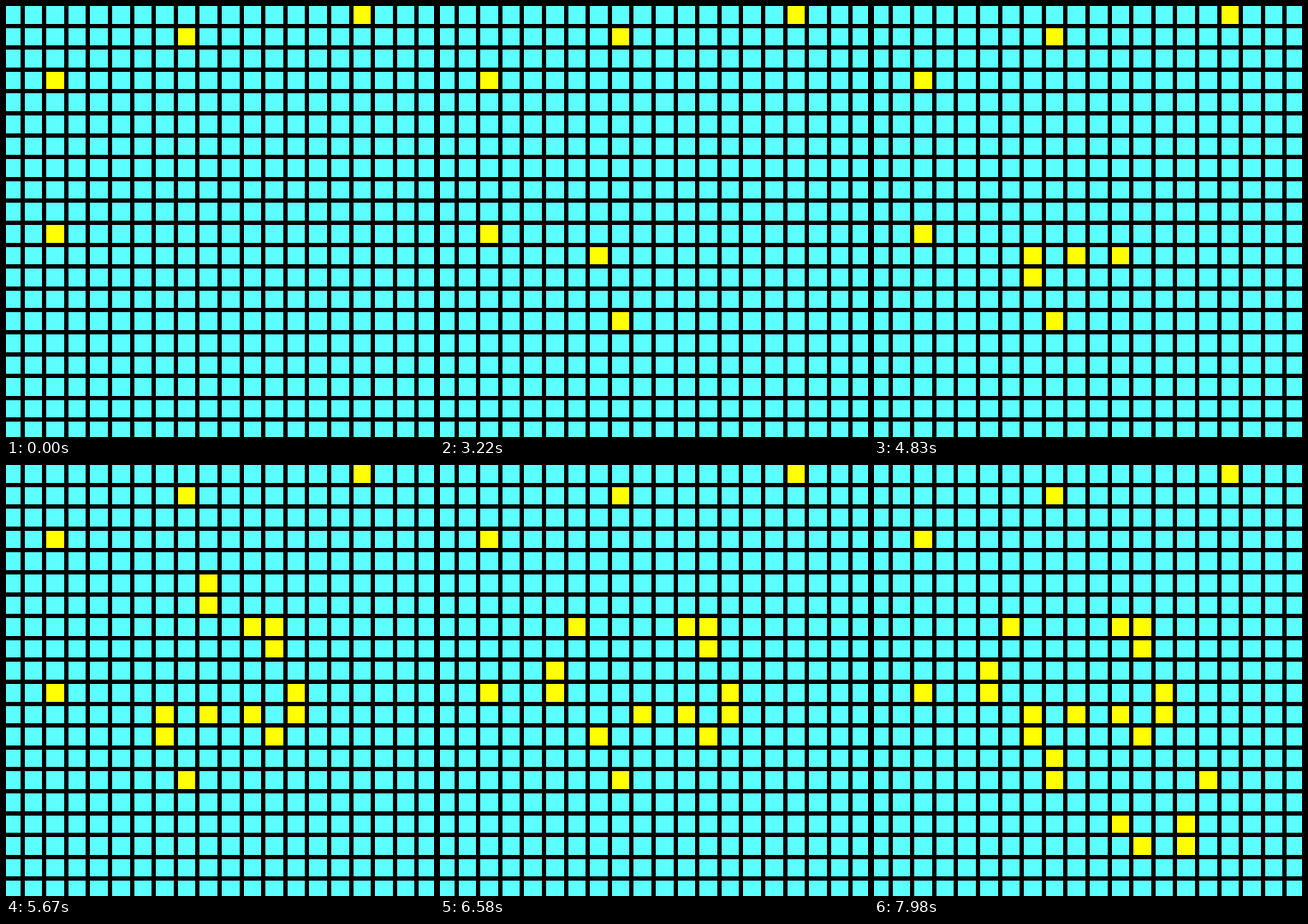
Recreate the animation shown at these times as an HTML page. Size 500 px wide and 504 px high, loop 8 s.

```html
<!DOCTYPE html>
<html lang="en">
<head>
<meta charset="utf-8">
<title>Toggle grid</title>
<style>
  html, body { margin: 0; width: 100%; height: 100%; overflow: hidden; background: #000; }
  svg { display: block; width: 500px; height: 504px; }
</style>
</head>
<body>
<svg id="stage" viewBox="0 0 500 504" shape-rendering="crispEdges"></svg>
<script>
const LOOP = 8000, TICK = 70, MOVE = 105;
const COUNT = 20, PITCH = 25.6, SIZE = 20.5, LEFT = -4;
const OFF = '#5cffff', ON = '#ffff00';
const stage = document.getElementById('stage');

// Cells lit from the start, as [column, row]
const lit = [[16, 0], [8, 1], [2, 3], [2, 10]];

// Pointer path in cell units, drawn as a smooth curve
const path = [
  [7.2, 11.6], [10.2, 10.7], [10.6, 11.3], [13.3, 11.4], [12.4, 8],
  [10.6, 7], [8.6, 4.6], [9.4, 6.45], [3.55, 6.6], [4.55, 8.55],
  [6.55, 10.9], [10.55, 15.6], [13.6, 17], [14.8, 14], [14.8, 14]
];

const index = (col, row) => row * COUNT + col;

// Catmull-Rom position on the path; whole numbers are its key points
function pointAt(u) {
  const i = Math.floor(u), f = u - i;
  const key = n => path[Math.max(0, Math.min(path.length - 1, n))];
  return [0, 1].map(axis => {
    const [a, b, c, d] = [-1, 0, 1, 2].map(n => key(i + n)[axis]);
    return b + f / 2 * (c - a + f * (2 * a - 5 * b + 4 * c - d + f * (3 * (b - c) + d - a)));
  });
}

const flips = [];
const click = (at, col, row) => flips.push({ at, cell: index(col, row) });

// Flips the cell under the pointer twice per path section
function drag(start, from, to) {
  for (let n = 0; from + n / 2 <= to; n++) {
    click(start + n * MOVE, ...pointAt(from + n / 2).map(Math.round));
  }
}

click(490, 7, 11);
for (const at of [1890, 1960, 3220]) click(at, 8, 14);
drag(4410, 0, 10);
drag(6860, 10, 14);

function addCell(col, row) {
  const rect = document.createElementNS('http://www.w3.org/2000/svg', 'rect');
  const span = (name, side, from) => {
    const start = Math.round(from);
    rect.setAttribute(name, start);
    rect.setAttribute(side, Math.round(from + SIZE) - start);
  };
  span('x', 'width', col * PITCH + LEFT);
  span('y', 'height', row * PITCH);
  return stage.appendChild(rect);
}

const cells = Array.from({ length: COUNT * COUNT },
  (_, i) => addCell(i % COUNT, Math.floor(i / COUNT)));

function draw(ms) {
  const now = Math.floor(ms / TICK) * TICK;
  const on = new Set(lit.map(([col, row]) => index(col, row)));
  for (const { at, cell } of flips) {
    if (at <= now && !on.delete(cell)) on.add(cell);
  }
  cells.forEach((rect, i) => rect.setAttribute('fill', on.has(i) ? ON : OFF));
}

const start = performance.now();
function tick() {
  draw((performance.now() - start) % LOOP);
  requestAnimationFrame(tick);
}
draw(0);
requestAnimationFrame(tick);
</script>
</body>
</html>
```
